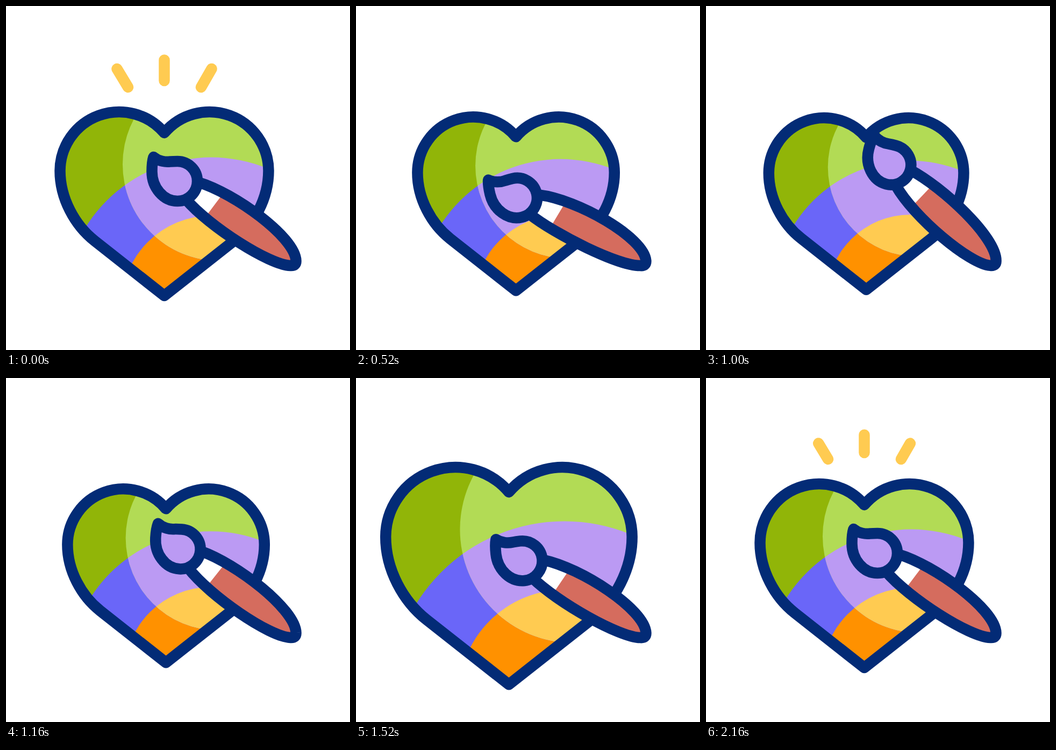
Write an HTML page that moves like this. It is 640 by 640 pixels and loops after 2200 ms.

```html
<!DOCTYPE html>
<html lang="en">
<head>
<meta charset="utf-8">
<title>Painted heart</title>
<style>
  html, body { margin: 0; width: 100%; height: 100%; overflow: hidden; background: #fff; }
  svg { display: block; width: 100vw; height: 100vh; }
  .line { fill: none; stroke: #032b76; stroke-width: 20.5; stroke-linecap: round; stroke-linejoin: round; }
  .rays { fill: none; stroke: #ffcb51; stroke-width: 20.5; stroke-linecap: round; }
  #outline { vector-effect: non-scaling-stroke; }
</style>
</head>
<body>
<svg viewBox="0 0 640 640">
  <defs>
    <path id="heart" d="M294.5 236A110 110 0 0 0 100.5 306.5C100.5 358 128 408 165 437L294.5 539L424 437C461 408 488.5 358 488.5 306.5A110 110 0 0 0 294.5 236Z"/>
    <path id="handle"/>
    <clipPath id="heartClip"><use id="heartMask" href="#heart"/></clipPath>
    <clipPath id="lightClip"><circle cx="396.4" cy="294.5" r="179.4"/></clipPath>
    <clipPath id="handleClip"><use href="#handle"/></clipPath>
  </defs>

  <path id="rays" class="rays"/>

  <g clip-path="url(#heartClip)">
    <g id="paint">
      <rect width="640" height="700" fill="#91b508"/>
      <circle cx="382" cy="557" r="275.4" fill="#6a66f8"/>
      <circle cx="382" cy="557" r="167" fill="#ff9100"/>
      <g clip-path="url(#lightClip)">
        <rect width="640" height="700" fill="#b2db55"/>
        <circle cx="382" cy="557" r="275.4" fill="#bb9af3"/>
        <circle cx="382" cy="557" r="167" fill="#ffcb51"/>
      </g>
    </g>
  </g>
  <path id="outline" class="line"/>

  <use href="#handle" fill="#fff"/>
  <path id="wood" fill="#d56c5e" clip-path="url(#handleClip)"/>
  <use href="#handle" class="line"/>
  <path id="bristles" class="line" style="fill:#bb9af3" d="M274.5 281C284 289 297 290.5 305 289.5C311 289 314 289 319 289A37 37 0 0 1 319 363C293 363 271.5 338 271.5 308C271.5 298 272 289 274.5 281Z"/>
</svg>
<script>
const LOOP = 2200, STEP = 40;
const $ = id => document.getElementById(id);
$('outline').setAttribute('d', $('heart').getAttribute('d'));

// [time, value] keys joined by sine easing
const BEAT = [[100, 1], [485, .93], [688, 1.13], [1076, .915], [1470, 1.187], [1930, 1]];
const SWING = [[0, 0], [475, -8.2], [905, 9.7], [1400, -5], [1740, 0]];
// inner end, outer end
const RAYS = [[227, 151, 206.5, 117], [294.5, 139, 294.5, 100.5], [363, 151, 382.5, 117]];

const HANDLE = 'M358 328C425 348 538 430 539.5 474Q540 484 529 483C490 482 378 410 335 360';
const WOOD = 'M412 338L640 338L640 560L360 560L360 407Z';
const END = [539, 483], REACH = 269, FLEX = .75;

const clamp = x => Math.min(1, Math.max(0, x));
const ease = x => (1 - Math.cos(Math.PI * x)) / 2;

function track(keys, t) {
  let value = keys[0][1];
  for (let i = 1; i < keys.length; i++) {
    const [t0, v0] = keys[i - 1], [t1, v1] = keys[i];
    if (t >= t0) value = v0 + (v1 - v0) * ease(clamp((t - t0) / (t1 - t0)));
  }
  return value;
}

const scaled = s => `translate(350 367) scale(${s}) translate(-350 -367)`;

// turn each point about the handle's end, more the farther it lies
function bend(path, angle) {
  return path.replace(/([\d.]+) ([\d.]+)/g, (_, px, py) => {
    const x = px - END[0], y = py - END[1];
    const a = angle * Math.PI / 180 * (Math.hypot(x, y) / REACH) ** FLEX;
    const c = Math.cos(a), s = Math.sin(a);
    return `${END[0] + x * c - y * s} ${END[1] + x * s + y * c}`;
  });
}

function rayPath(from, to) {
  if (to - from < .005) return '';
  return RAYS.map(([x0, y0, x1, y1]) => {
    const at = k => `${x0 + (x1 - x0) * k} ${y0 + (y1 - y0) * k}`;
    return `M${at(from)}L${at(to)}`;
  }).join('');
}

function draw(t) {
  const beat = scaled(track(BEAT, t));
  $('heartMask').setAttribute('transform', beat);
  $('outline').setAttribute('transform', beat);
  // the colours run slightly ahead of the outline
  $('paint').setAttribute('transform', scaled(track(BEAT, t + 18)));

  const swing = track(SWING, t);
  $('handle').setAttribute('d', bend(HANDLE, swing));
  $('wood').setAttribute('d', bend(WOOD, swing));
  $('bristles').setAttribute('transform',
    `rotate(${swing} ${END}) rotate(${swing * FLEX} 319 326)`);

  $('rays').setAttribute('d', t < 1000
    ? rayPath(ease(clamp(t / 360)), 1)
    : rayPath(0, clamp((t - 1900) / 300)));
}

const start = performance.now();
function tick() {
  const t = (performance.now() - start) % LOOP;
  draw(Math.floor(t / STEP) * STEP);
  requestAnimationFrame(tick);
}
tick();
</script>
</body>
</html>
```
